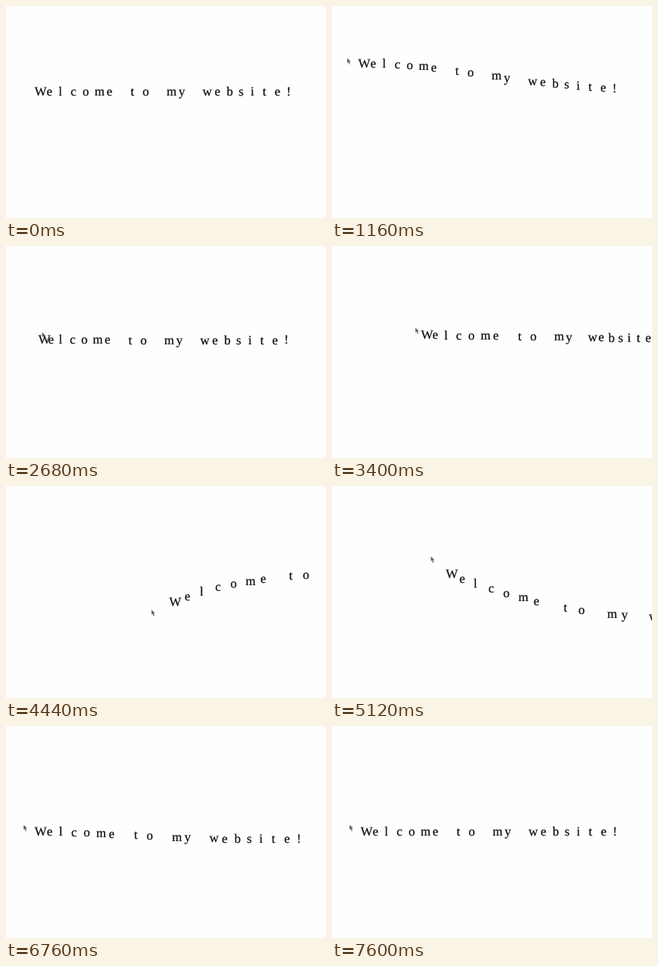
Animation, 400 px wide and 265 px high, one loop 7.68 s. Source, as an HTML page:

```html
<!DOCTYPE html>
<html lang="en">
<head>
<meta charset="utf-8">
<title>Trailing text</title>
<style>
  html, body { margin: 0; width: 100%; height: 100%; overflow: hidden; background: #fefefe; }
  svg { display: block; width: 400px; height: 265px; }
  text {
    font: 16px "Liberation Serif", "Times New Roman", serif;
    fill: #0a0a0a; stroke: #0a0a0a; stroke-width: .2px;
    text-rendering: geometricPrecision;
  }
</style>
</head>
<body>
<svg id="stage" viewBox="0 0 400 265">
  <path id="pointer" d="M0 0V6.2L1.4 5 2.6 8 3.7 7.5 2.6 4.8 4.4 4.6Z" fill="#2c2c2c" fill-opacity=".75"/>
</svg>
<script>
const MESSAGE = "Welcome to my website!";
const LOOP = 7680, TICK = 40, START = 600;
const STALL = { from: 5800, to: 6160 };   // the picture freezes in between
const SPEED = 0.6, SPACING = 15;
const LEFT = 35.8, BASELINE = 5;

// Strokes of the hand: each eases the pointer to a new value
const move = (from, to, value) => ({ from, to, value });
const HOME = { x: 0, y: 107 };
const SWEEPS = {
  x: [
    move(600, 1100, -3), move(2570, 2880, 88), move(2900, 3200, 73),
    move(3290, 4000, 217), move(4000, 4520, 156), move(4700, 5040, 106),
    move(5050, 5590, 11), move(6300, 6600, 0)
  ],
  y: [
    move(580, 1000, 71), move(1080, 1360, 84), move(1400, 1720, 118),
    move(2200, 4000, 108), move(4210, 4500, 170), move(4740, 5200, 90),
    move(5290, 5530, 143), move(6300, 6600, 132)
  ]
};

function ease(from, to, time) {
  const k = Math.min(1, Math.max(0, (time - from) / (to - from)));
  return k * k * (3 - 2 * k);
}

function pointerAt(time) {
  const along = axis => SWEEPS[axis].reduce(
    (value, m) => value + (m.value - value) * ease(m.from, m.to, time), HOME[axis]);
  return { x: along("x"), y: along("y") };
}

// Each letter chases the one before it; the first chases the pointer.
function simulate() {
  const states = [];
  let pointer = HOME;
  let trail = Array.from(MESSAGE, () => HOME);
  for (let time = 0; time < LOOP; time += TICK) {
    const stalled = time > STALL.from && time < STALL.to;
    if (time >= START && !stalled) {
      let leader = pointer;
      trail = trail.map(p => leader = {
        x: p.x + (leader.x - p.x) * SPEED,
        y: p.y + (leader.y - p.y) * SPEED
      });
      pointer = pointerAt(time);
    }
    states.push({ pointer, trail, visible: time >= START });
  }
  return states;
}

const stage = document.getElementById("stage");
const pointerShape = document.getElementById("pointer");
const letters = Array.from(MESSAGE, char => {
  const node = document.createElementNS("http://www.w3.org/2000/svg", "text");
  node.textContent = char;
  return stage.insertBefore(node, pointerShape);
});
const states = simulate();

function place(node, x, y) {
  node.setAttribute("transform", `translate(${x.toFixed(2)} ${y.toFixed(2)})`);
}

function draw(time) {
  const { pointer, trail, visible } = states[Math.floor((time % LOOP) / TICK)];
  trail.forEach((p, i) => place(letters[i], LEFT + i * SPACING + p.x, p.y + BASELINE));
  place(pointerShape, 22 + pointer.x, pointer.y - 8.5);
  pointerShape.setAttribute("visibility", visible ? "visible" : "hidden");
}

const begin = performance.now();
function loop() {
  draw(performance.now() - begin);
  requestAnimationFrame(loop);
}
loop();
</script>
</body>
</html>
```
